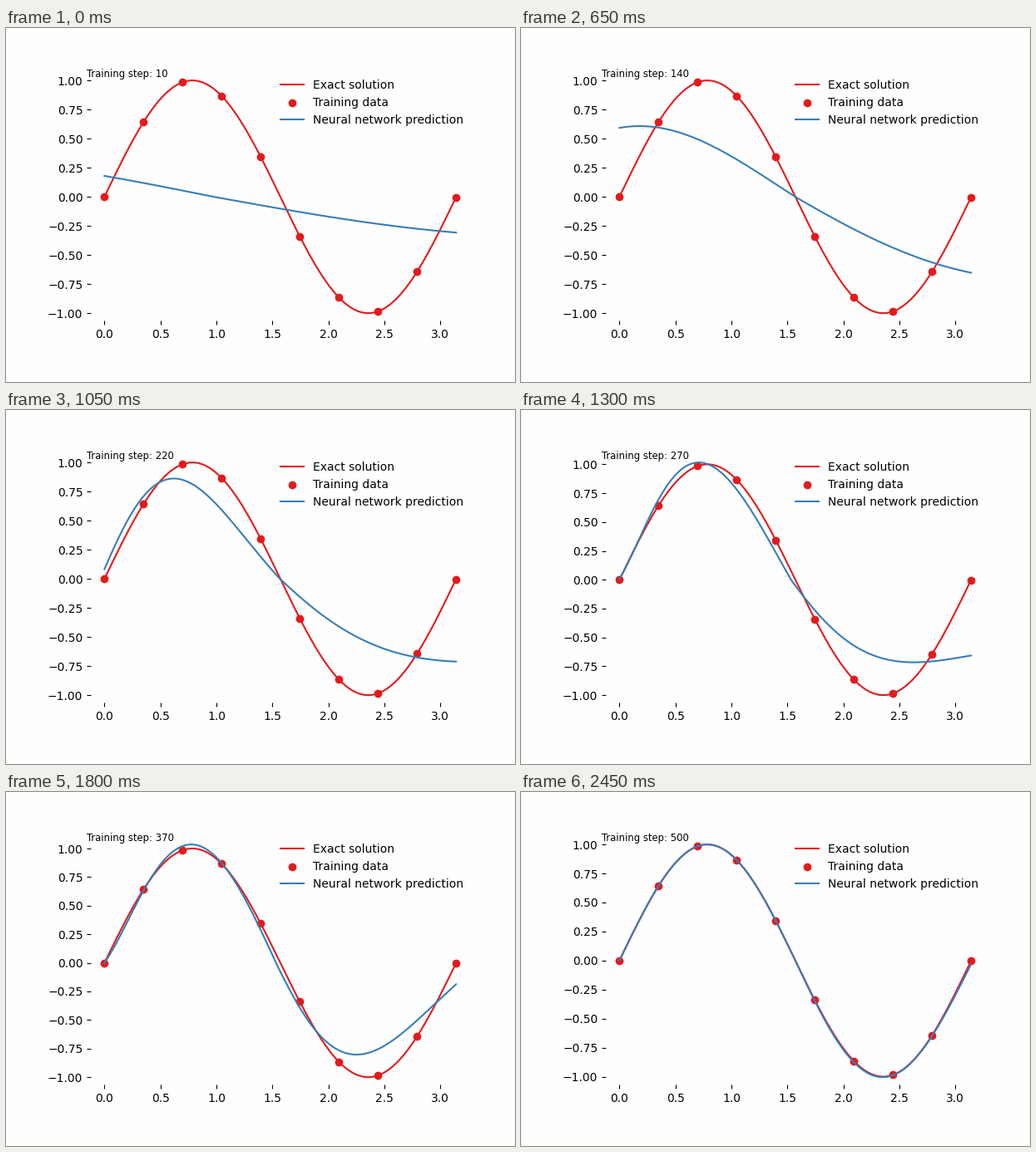
Animation of 612 by 426 pixels, one loop 2500 ms. Source, as a matplotlib script:

```python
import matplotlib.pyplot as plt
import numpy as np
from matplotlib.animation import FuncAnimation

W, H, DPI = 612, 426, 100
AX_W, AX_H, PAD = 465, 308, 50
N_FRAMES, INTERVAL = 50, 50
X_END = 3.14
RED, BLUE, PAPER = "#e41a1c", "#377eb8", "#fefefe"

plt.rcParams.update({
    "font.family": "DejaVu Sans",
    "font.size": 10,
    "xtick.direction": "in",
    "ytick.direction": "in",
})


def rise(step, centre, width):
    return 1 / (1 + np.exp((centre - step) / width))


def bump(step, centre, width):
    return np.exp(-((step - centre) / width) ** 2 / 2)


def wave(v, amp, end, bow):
    """Half wave whose phase runs from 0 to end, bent by bow."""
    return amp * np.sin(end * v + bow * v * (1 - v))


def exact(x):
    return np.sin(2 * x)


def predict(x, step):
    """Two half waves that meet at a zero crossing; the left one learns first."""
    overshoot = bump(step, 320, 40)
    zero = np.pi / 2 - .98 * np.exp(-step / 20) - .085 * overshoot

    v = np.clip((zero - x) / zero, 0, 1)
    amp = (1 - .84 * np.exp(-step / 39) - .39 * bump(step, 155, 45)
           + .09 * overshoot)
    end = 1.1 - .7 * np.exp(-step / 45) + 2.04 * rise(step, 153, 22)
    left = wave(v, amp, end, -1.15 * bump(step, 220, 42))
    left *= 1 - .8 * overshoot * v**6

    v = np.clip((x - zero) / (X_END - zero), 0, 1)
    amp = .715 * (1 - np.exp(-step / 15)) + .29 * rise(step, 385, 18)
    end = 1.08 + 2.04 * rise(step, 280, 42)
    right = wave(v, amp, end, 1.3 * bump(step, 325, 78))

    return left - right


x = np.linspace(0, X_END, 300)
x_train = np.linspace(0, X_END, 10)

fig = plt.figure(figsize=(W / DPI, H / DPI), dpi=DPI, facecolor=PAPER)
ax = fig.add_axes([.16, .16, AX_W / W, AX_H / H])
ax.set_facecolor(PAPER)
for spine in ax.spines.values():
    spine.set_visible(False)

ax.plot(x, exact(x), color=RED, label="Exact solution")
ax.scatter(x_train, exact(x_train), color=RED, label="Training data")
prediction, = ax.plot(x, 0 * x, color=BLUE, label="Neural network prediction")
ax.set_xlim(-.05 * X_END, 1.05 * X_END)
ax.legend(loc="upper right", frameon=False)
caption = ax.text(0, 1, "", transform=ax.transAxes, va="top",
                  fontsize="small")


def update(i):
    step = 10 * (i + 1)
    y = predict(x, step)
    prediction.set_ydata(y)
    caption.set_text(f"Training step: {step}")

    low, high = min(-1, y.min()), max(1, y.max())
    margin = .05 * (high - low)
    ax.set_ylim(low - margin, high + margin)

    # Keep the tick labels a fixed distance from the left and bottom edges.
    box, pos = ax.get_tightbbox(), ax.get_position()
    ax.set_position([pos.x0 + (PAD - box.x0) / W, pos.y0 + (PAD - box.y0) / H,
                     AX_W / W, AX_H / H])
    return prediction, caption


anim = FuncAnimation(fig, update, frames=N_FRAMES, interval=INTERVAL,
                     init_func=lambda: update(0), repeat=True,
                     repeat_delay=0, blit=False)
plt.show()
```
